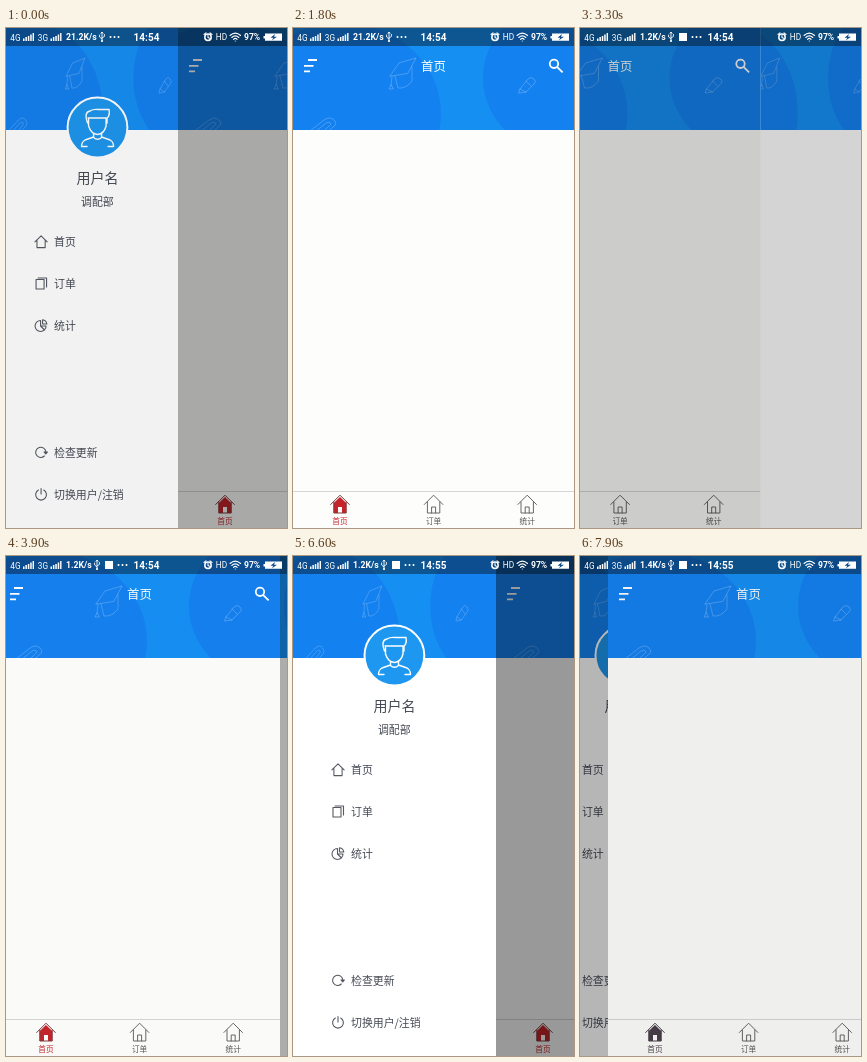
An HTML page for the animation above (8000 ms loop, 281x500 px).

```html
<!DOCTYPE html>
<html lang="zh-CN">
<head>
<meta charset="utf-8">
<style>
html, body { margin: 0; width: 100%; height: 100%; overflow: hidden; background: #fff; }
svg { display: block; width: 281px; height: 500px; font-family: "Noto Sans CJK SC", "Noto Sans CJK", sans-serif; }
.line { fill: none; stroke: currentColor; stroke-linecap: round; stroke-linejoin: round; }
.mid { text-anchor: middle; }
#status { font-family: Roboto, sans-serif; fill: #fff; color: #fff; }
#status .b { font-weight: 700; }
</style>
</head>
<body>
<svg viewBox="0 0 281 500">
  <defs>
    <clipPath id="band"><rect width="281" height="102"/></clipPath>
    <g id="header" clip-path="url(#band)">
      <rect width="281" height="102" fill="#168ff3"/>
      <g fill="#1481f0">
        <ellipse cx="48" cy="85" rx="100" ry="90"/>
        <circle cx="262" cy="50" r="72"/>
      </g>
      <g class="line" color="#fff" stroke-opacity=".25" stroke-width=".9">
        <path d="M97 48L106 35L123 30L115 45ZM102 48L105 60Q113 61 119 53L119 39M99 49L98 57M98 57L96 61H100Z"/>
        <path d="M227 61L235 51Q238 48 241 51T241 56L233 64L226 65ZM233 53L238 58M227 61L233 64"/>
        <path d="M17 103L31 92Q37 88 41 92T40 99L30 108M21 105L33 95Q37 93 38 96L28 106"/>
      </g>
    </g>
    <path id="home" class="line" d="M-9.3 1.5L0 -7.8L9.3 1.5M-6.2 -1V10H6.2V-1"/>
    <path id="door" class="line" d="M-2 10V4H2V10"/>
    <path id="bars" d="M0 13V10.5H1.5V13ZM2.4 13V9H3.9V13ZM4.8 13V8H6.3V13ZM7.2 13V6.5H8.7V13ZM9.6 13V5H11V13Z"/>
  </defs>

  <g id="left">
    <rect width="203" height="500" fill="#fff"/>
    <use href="#header" transform="scale(.7224 1)"/>
    <circle cx="101.4" cy="99.5" r="29.9" fill="#1d97ef" stroke="#fff" stroke-width="2"/>
    <path class="line" color="#fff" stroke-width="1.4" d="M91.5 95Q87.5 84 94 83Q97 81 102 81.5H113Q114 88 111 90V95M92 90H110M92.5 91V98Q95 106 101.5 106.5Q108 106 110 98V91M97.5 106V109L89 112Q85.5 114 85.5 118.5H91M105.5 106V109L114 112Q117.5 114 117.5 118.5H112M97.5 109.5Q101.5 113 105.5 109.5"/>
    <g fill="#454953">
      <text class="mid" x="101.5" y="154.8" font-size="14">用户名</text>
      <text class="mid" x="101.3" y="178" font-size="10.9">调配部</text>
      <g id="menu" font-size="10.9"></g>
    </g>
    <g class="line" color="#555961" stroke-width="1.1">
      <use href="#home" transform="translate(45 213) scale(.66)" stroke-width="1.6"/>
      <path d="M40 251.5H48V261H40ZM42 250H50.5V259"/>
      <path d="M44.5 292.5A5.5 5.5 0 1 0 50 298H44.5ZM46.5 291.7A5 5 0 0 1 50.8 296H46.5ZM44.5 298L48.5 302"/>
      <path d="M48.3 428A5.1 5.1 0 1 1 49.8 424"/>
      <path d="M48 424H51.4L49.7 426Z" fill="#555961"/>
      <path d="M42.3 462A5.4 5.4 0 1 0 47.7 462M45 460.5V466"/>
    </g>
    <rect class="dim" width="203" height="500"/>
  </g>

  <g id="right">
    <rect width="203" height="500" fill="#fdfefc"/>
    <use href="#header" transform="scale(.7224 1)"/>
    <rect class="dim" width="203" height="500"/>
  </g>

  <g id="main">
    <rect width="281" height="500" fill="#fdfdfc"/>
    <use href="#header"/>
    <g fill="none" stroke="#fff" stroke-width="1.8">
      <path d="M15 32H24M11 37.8H20.5M11 43.3H17"/>
      <circle cx="261" cy="35.8" r="4.2"/>
      <path d="M264 38.8L269.6 44.3"/>
    </g>
    <text class="mid" x="140.5" y="42.5" font-size="12.4" fill="#fff">首页</text>
    <path d="M0 463.5H281" stroke="#d6d6d6"/>
    <g id="tabs" font-size="7.7"></g>
    <rect id="shade" width="281" height="500"/>
  </g>

  <rect width="281" height="18" fill-opacity=".4"/>
  <g id="status">
    <text x="4.3" y="12.7" font-size="8.2">4G</text>
    <use href="#bars" x="17"/>
    <text x="31.8" y="12.7" font-size="8.2">3G</text>
    <use href="#bars" x="44.5"/>
    <text id="speed" class="b" x="60" y="12.3" font-size="8.7"></text>
    <g id="usb">
      <path class="line" stroke-width=".9" d="M0 4.5V13M0 11L-2.4 9V7M0 10L2.4 8.5V6.5M-1 5.3L0 4L1 5.3"/>
      <circle cy="13" r="1.1"/>
    </g>
    <rect id="badge" x="99" y="5" width="8" height="8"/>
    <path id="dots" class="line" stroke-width="2" d="M0 9h.01M4 9h.01M8 9h.01"/>
    <text id="clock" class="b mid" x="140.5" y="12.8" font-size="10"></text>
    <circle cx="202" cy="9.2" r="3.2" fill="none" stroke="#fff" stroke-width="1.5"/>
    <path class="line" stroke-width="1.1" d="M198 6.5L200 4.8M206 6.5L204 4.8M202 7.5V9.5L203.5 10.2"/>
    <text x="209.8" y="12.2" font-size="8.3">HD</text>
    <path class="line" stroke-width="1.1" d="M224 7.5Q229.3 2.8 234.6 7.5M225.8 9.5Q229.3 6.2 232.8 9.5M227.5 11.3Q229.3 9.6 231.1 11.3M229.3 13h.01"/>
    <text class="b" x="238" y="12.2" font-size="8.6">97%</text>
    <path d="M257.5 8H259V5.5H276V12.8H259V10.5H257.5Z"/>
    <path d="M269 6L264.5 9.7H267.3L266 12.3L271 8.7H268Z" fill="#0c4a88"/>
  </g>
</svg>
<script>
const OPEN = 203, PARALLAX = 65, LOOP = 8000, STEP = 100;
const $ = id => document.getElementById(id);
const move = (id, x) => $(id).setAttribute('transform', `translate(${x.toFixed(2)} 0)`);

$('menu').innerHTML = [['首页', 213.5], ['订单', 255.7], ['统计', 298], ['检查更新', 424.5], ['切换用户/注销', 466.7]]
  .map(([label, y]) => `<text x="58" y="${y + 4}">${label}</text>`).join('');

$('tabs').innerHTML = ['首页', '订单', '统计'].map((label, i) => {
  const x = 47 + i * 93.6, attrs = i ? 'color="#666" fill="#555"' : 'id="active"';
  const body = i ? '' : '<path d="M-6.2 10V0L0 -6L6.2 0V10H2V4H-2V10Z"/>';
  return `<g ${attrs}><g transform="translate(${x} 475)">${body}<use href="#home"/>${i ? '<use href="#door"/>' : ''}</g>
    <text class="mid" x="${x}" y="496">${label}</text></g>`;
}).join('');

// time, page offset, drawer lag
const keys = [
  [0, 172], [100, 203], [200, 203], [1200, 46, -2], [1800, 0], [1900, 0],
  [2400, -140], [2600, -185], [2800, -203], [3400, -80], [3900, -7], [4400, 0], [4500, 0],
  [4800, 157, -3.3], [5000, 187], [5400, 203], [7500, 203], [7900, 28], [8000, 10]
];

function pose(t) {
  const i = keys.findIndex(k => k[0] > t);
  const [t0, x0, lag0 = 0] = keys[i - 1], [t1, x1, lag1 = 0] = keys[i];
  const f = (t - t0) / (t1 - t0);
  return [x0 + (x1 - x0) * f, lag0 + (lag1 - lag0) * f];
}

function draw(now) {
  const t = Math.floor(now % LOOP / STEP) * STEP;
  const [x, lag] = pose(t);
  const p = Math.abs(x) / OPEN, hidden = PARALLAX * (1 - p);

  move('main', x);
  move('left', lag - hidden);
  move('right', 281 - OPEN + hidden);
  $('left').style.display = x > 0 ? '' : 'none';
  $('right').style.display = x < 0 ? '' : 'none';
  $('shade').setAttribute('opacity', .395 * p);
  document.querySelectorAll('.dim').forEach(e => e.setAttribute('opacity', .33 * (1 - p)));

  const tint = t >= 7600 ? '#483e48' : t >= 4600 && t < 5500 ? '#7a5a62' : '#c4242a';
  $('active').setAttribute('fill', tint);
  $('active').setAttribute('color', t >= 7600 ? '#483e48' : '#7c3a3c');

  const early = t < 2000;
  $('speed').textContent = early ? '21.2K/s' : t < 7600 ? '1.2K/s' : '1.4K/s';
  $('clock').textContent = t < 4600 ? '14:54' : '14:55';
  $('badge').style.display = early ? 'none' : '';
  move('usb', early ? 96 : 91);
  move('dots', early ? 104.5 : 112.5);
}

const start = performance.now();
function loop() {
  draw(performance.now() - start);
  requestAnimationFrame(loop);
}
loop();
</script>
</body>
</html>
```
